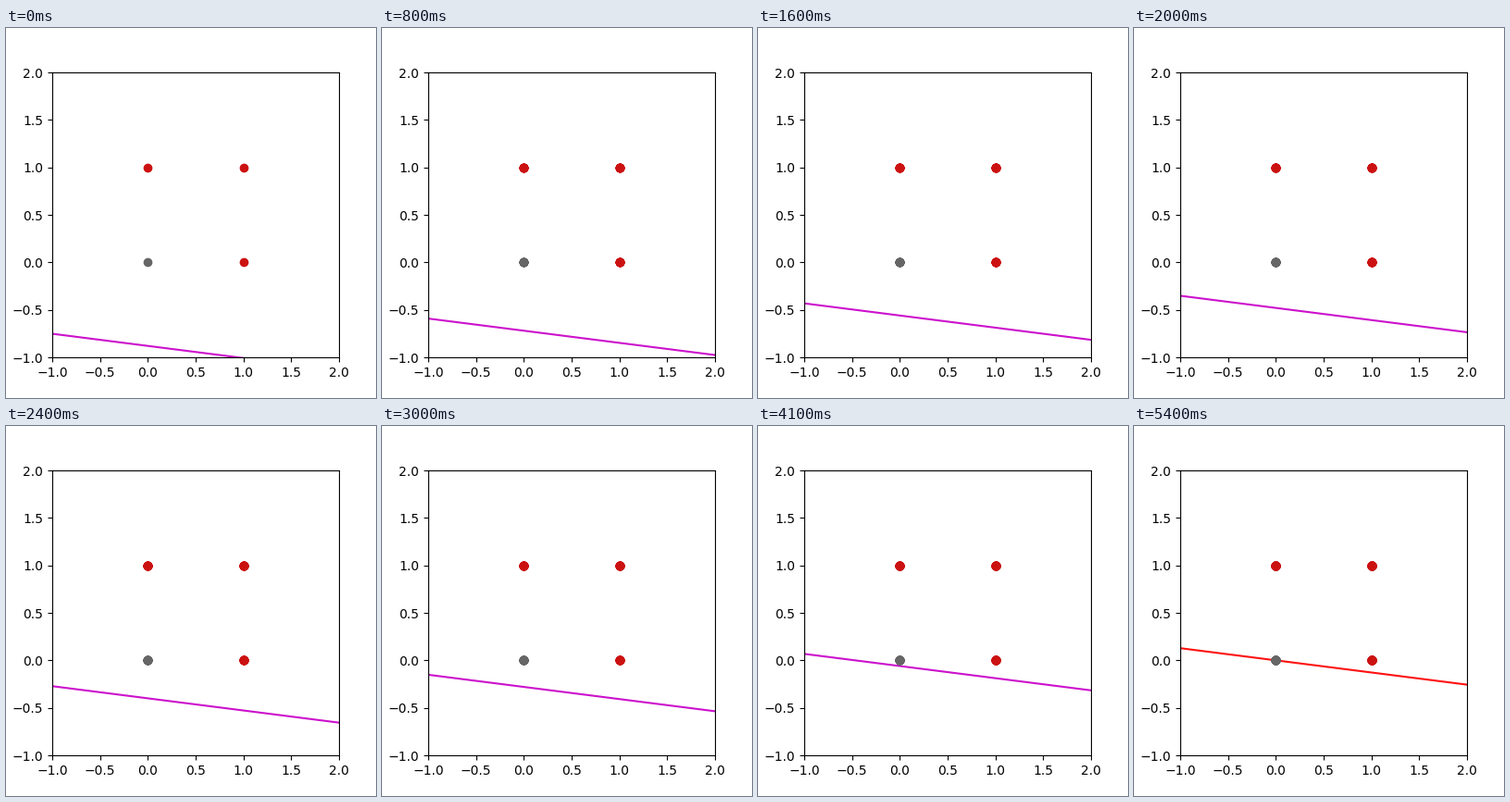
A matplotlib script for the animation above (5500 ms loop, 400 by 400 pixels).

```python
import matplotlib.pyplot as plt
import numpy as np
from matplotlib.animation import FuncAnimation

plt.rcParams["font.family"] = "DejaVu Sans"

FRAMES, INTERVAL = 55, 100
SLOPE = -0.128
START, STEP = -0.88, 0.02
SETTLED = 45  # frame at which the boundary turns red

fig, ax = plt.subplots(figsize=(4, 4), dpi=100)
ax.set(xlim=(-1, 2), ylim=(-1, 2))
ticks = np.arange(-1, 2.1, 0.5)
ax.set_xticks(ticks)
ax.set_yticks(ticks)

xs = np.array([-1.0, 2.0])
boundary, = ax.plot([], [], lw=1.5)
off_points = np.array([[0, 0]])
on_points = np.array([[0, 1], [1, 0], [1, 1]])
off_dots, = ax.plot([], [], "o", color="#666666")
on_dots, = ax.plot([], [], "o", color="#cc1111")


def stack_dots(dots, points, count):
    """Overlay the markers count times, which hardens their soft edges."""
    dots.set_data(*np.tile(points, (count, 1)).T)


def update(frame):
    intercept = min(START + STEP * frame, 0)
    boundary.set_data(xs, SLOPE * xs + intercept)
    boundary.set_color("#ff1111" if frame >= SETTLED else "#cc11cc")
    stack_dots(off_dots, off_points, frame + 1)
    stack_dots(on_dots, on_points, frame + 1)
    return boundary, off_dots, on_dots


anim = FuncAnimation(fig, update, frames=FRAMES, interval=INTERVAL,
                     repeat=True, repeat_delay=0)
plt.show()
```
